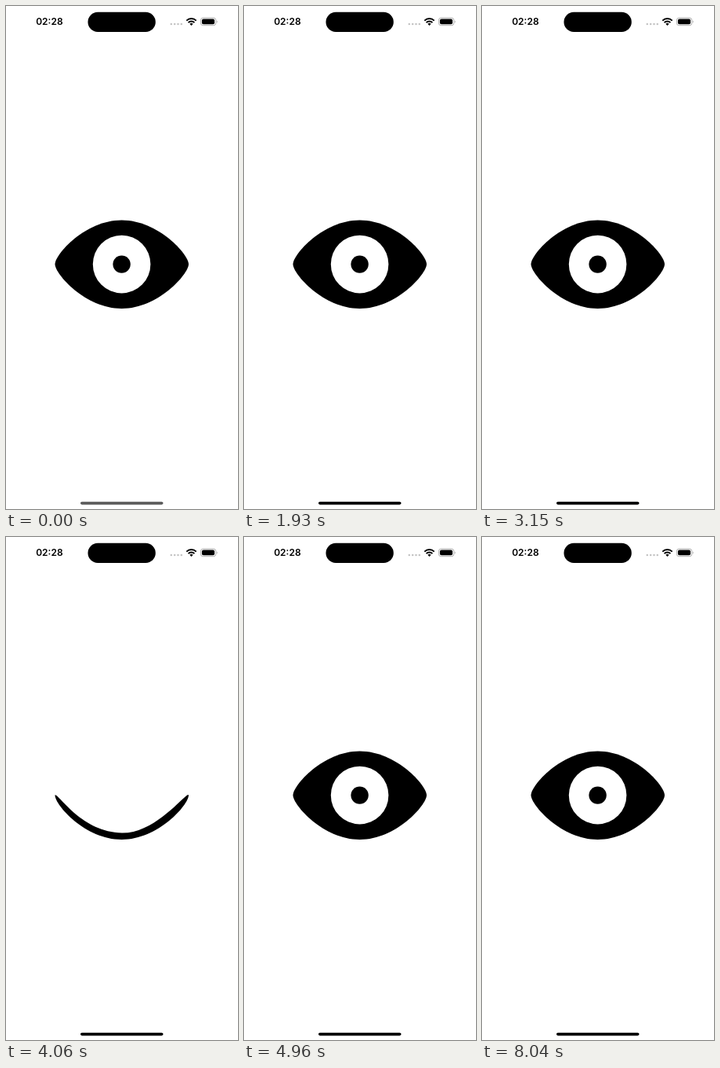
Animation, 296 px wide and 640 px high, one loop 8.46 s. Source, as an HTML page:

```html
<!DOCTYPE html>
<html lang="en">
<head>
<meta charset="utf-8">
<title>Blinking eye</title>
<style>
  html, body { margin: 0; width: 100%; height: 100%; overflow: hidden; background: #fff; }
  svg { display: block; width: 296px; height: 640px; }
  text { font: 600 12px Inter, "Liberation Sans", sans-serif; }
</style>
</head>
<body>
<svg viewBox="0 0 296 640">
  <defs><clipPath id="opening"><path id="gap"/></clipPath></defs>

  <text x="38.2" y="24.4">02:28</text>
  <rect x="104.5" y="7.8" width="86.3" height="25.2" rx="12.6"/>
  <g fill="#c4c4c4">
    <circle cx="210.8" cy="23" r="1.3"/><circle cx="215.2" cy="23" r="1.3"/>
    <circle cx="219.5" cy="23" r="1.3"/><circle cx="223.8" cy="23" r="1.3"/>
  </g>
  <g fill="none" stroke="#000" stroke-width="2">
    <path d="M230.3 18.6a8.9 8.9 0 0 1 12.4 0"/>
    <path d="M232.6 21.1a5.6 5.6 0 0 1 7.8 0"/>
  </g>
  <path d="M236.5 24.9L234.4 22.7a3 3 0 0 1 4.2 0z"/>
  <rect x="248.4" y="15.1" width="19.4" height="9.6" rx="3" fill="none" stroke="#a8a8a8" stroke-width=".9"/>
  <rect x="249.9" y="16.6" width="16.2" height="6.6" rx="1.9"/>
  <path d="M268.8 18.4a1.7 1.7 0 0 1 0 3z" fill="#a8a8a8"/>

  <path id="eye"/>
  <g clip-path="url(#opening)">
    <circle cx="147.6" cy="328.6" r="36.8" fill="#fff"/>
    <circle cx="147.6" cy="328.6" r="11.2"/>
  </g>
  <rect id="bar" x="95" y="630.8" width="105.5" height="3.6" rx="1.8"/>
</svg>
<script>
  const LOOP = 8460;
  const BAR_DARK = 1550;
  const BOTTOM = "C233 341 194 385 147.6 385S62.5 341 62.5 328.5Z";

  // eye: outline of the black shape; gap: where the iris shows
  const poses = {
    open: {
      eye: "M62.5 328.5C62.5 316 101 272.4 147.6 272.4S233 316 233 328.5" + BOTTOM,
      gap: "M60 270H236V390H60Z"
    },
    half: {
      eye: "M62 328.6C62 325.6 106 322.2 147.6 322.2S233.6 325.6 233.6 328.6" +
           "C233.6 341 195 383 147.6 383S62 341 62 328.6Z",
      gap: "M100 328Q147.6 326.8 196 328V390H100Z"
    },
    low: {
      eye: "M62.5 328.5C64 326 101 349 147.6 349S231.5 326 233 328.5" + BOTTOM,
      gap: "M100 345Q147.6 363 195 345V390H100Z"
    },
    shut: {
      eye: "M62.5 328.5C66 325 96 376 148 376.5C186 377 220 337 231 328.4Q233 327.4 233 328.5" + BOTTOM,
      gap: "M0 0"
    }
  };

  // [closing starts, lid low, shut, open again]
  const blinks = [
    [1470, 1550, 1630, 1930],
    [2670, 2750, 2830, 3150],
    [3910, 3990, 4060, 4390],
    [4660, 4740, 4810, 4960],
    [7570, 7650, 7720, 8040]
  ];
  const order = ["half", "low", "shut", "open"];
  const steps = blinks.flatMap(b => b.map((at, i) => [at, order[i]]));

  const [eye, gap, bar] = ["eye", "gap", "bar"].map(id => document.getElementById(id));

  function draw(now) {
    const t = now % LOOP;
    let name = "open";
    for (const [at, pose] of steps) if (t >= at) name = pose;
    eye.setAttribute("d", poses[name].eye);
    gap.setAttribute("d", poses[name].gap);
    bar.setAttribute("fill", t < BAR_DARK ? "#5c5c5c" : "#000");
  }

  const start = performance.now();
  function tick() {
    draw(performance.now() - start);
    requestAnimationFrame(tick);
  }
  tick();
</script>
</body>
</html>
```
